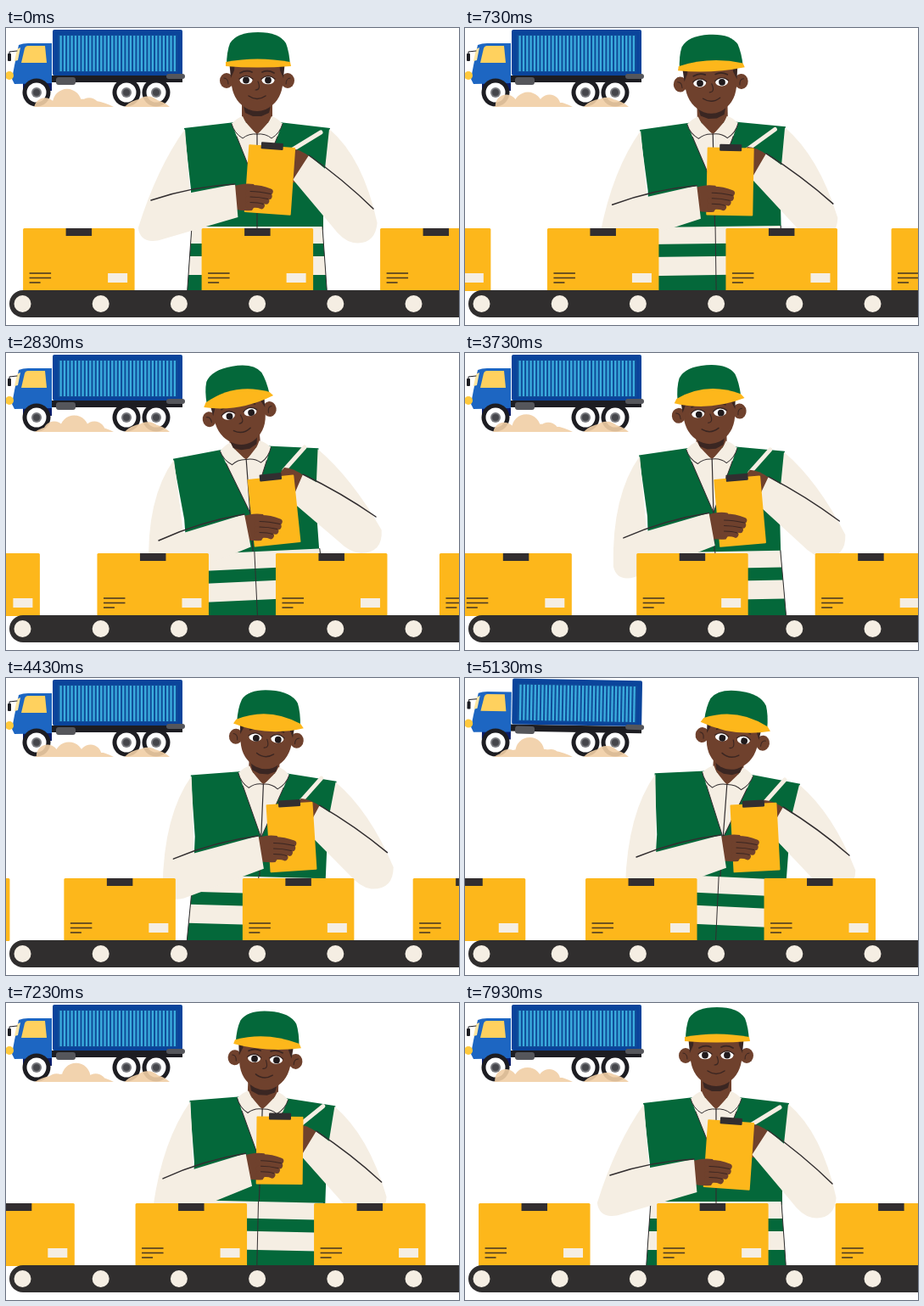
Animation of 534x350 px, one loop 8010 ms. Source, as an HTML page with a canvas:

```html
<!DOCTYPE html>
<html lang="en">
<head>
<meta charset="utf-8">
<title>Warehouse check</title>
<style>
html, body { margin: 0; width: 100%; height: 100%; overflow: hidden; background: #fff; }
canvas { display: block; width: 534px; height: 350px; }
</style>
</head>
<body>
<canvas id="stage"></canvas>
<script>
const W = 534, H = 350, LOOP = 8010, LAST = 7930;
const GREEN = '#04683a', YELLOW = '#fdb71b', CREAM = '#f5eee3', DARK = '#322e30', SKIN = '#6f412d', SHADE = '#3a2622';
const INK = '#1d1d22', STEEL = '#55565b', NAVY = '#0a449b';
const canvas = document.getElementById('stage');
const c = canvas.getContext('2d');
const dpr = window.devicePixelRatio || 1;
canvas.width = W * dpr;
canvas.height = H * dpr;

const mix = (a, b, k) => a + (b - a) * k;
const ease = (a, b, t) => (1 - Math.cos(Math.PI * Math.min(1, Math.max(0, (t - a) / (b - a))))) / 2;

// Path from segments: 2 numbers = line, 4 = quadratic
function trace(segs) {
  c.beginPath();
  segs.forEach((s, i) => {
    if (i === 0) c.moveTo(...s);
    else if (s.length === 2) c.lineTo(...s);
    else c.quadraticCurveTo(...s);
  });
}
function fill(color, ...segs) { trace(segs); c.closePath(); c.fillStyle = color; c.fill(); }
function stroke(color, width, ...segs) {
  trace(segs);
  c.strokeStyle = color; c.lineWidth = width; c.lineCap = 'round'; c.lineJoin = 'round';
  c.stroke();
}
// Closed shape from its right half, mirrored about x = 0
function mirrored(color, ...half) {
  fill(color, ...half, ...half.map(([x, y]) => [-x, y]).reverse());
}
function oval(color, x, y, rx, ry = rx) {
  c.beginPath(); c.ellipse(x, y, rx, ry, 0, 0, 7); c.fillStyle = color; c.fill();
}
function rect(color, x, y, w, h, r = 0) {
  c.beginPath(); c.roundRect(x, y, w, h, r); c.fillStyle = color; c.fill();
}
function turned(x, y, deg, draw) {
  c.save(); c.translate(x, y); c.rotate(deg * Math.PI / 180); draw(); c.restore();
}

// Truck
const TRUCK_LOOP = 3680;

function truckBody() {
  rect(INK, 50, 56, 158, 8);
  rect(NAVY, 55, 2, 153, 54, 2);
  rect('#104c99', 61, 8, 141, 44);
  for (let i = 0; i < 32; i++) rect('#3badde', 63.5 + i * 4.33, 9, 2.3, 42);
  rect(STEEL, 189, 54, 22, 6, 3);
  rect(STEEL, 59, 58, 23, 9, 3);
  fill('#0a1d6b', [20, 60], [54, 60], [54, 74], [20, 74]);
  fill('#1d66c2', [15, 20], [20, 18, 26, 18], [54, 18], [54, 65], [10, 66], [7, 60], [10, 44]);
  fill('#ffd15e', [22, 24], [23, 21, 26, 21], [46, 21], [48, 41], [18, 41]);
  fill('#ffe6a3', [13, 25], [17, 23], [14, 38], [10, 39]);
  stroke(INK, 1, [13, 27], [4, 28], [4, 31]);
  rect(INK, 2, 30, 4, 9, 1);
  oval('#ffc93c', 4, 56, 5);
}

function wheel(x) {
  oval(INK, x, 76, 16.5);
  oval('#fff', x, 76, 11.5);
  oval('#77787d', x, 76, 6);
  oval('#45464b', x, 76, 4);
}

function dust(s) {
  const wave = 3 * Math.sin(4 * Math.PI * s - 0.4);
  c.save();
  c.beginPath(); c.rect(0, 60, 230, 33); c.clip();
  c.globalAlpha = 0.9;
  c.beginPath();
  for (const [x, w] of [[34, 93], [140, 53]]) {
    c.moveTo(x, 93);
    c.bezierCurveTo(x + w * 0.2, 80, x + w * 0.75, 80, x + w, 93);
  }
  const puff = (x, top, r) => { c.moveTo(x + r, top + r); c.arc(x, top + r, r, 0, 7); };
  for (let i = 0; i < 3; i++) {
    const mid = i === 1;
    puff(46 + 26 * i + (14 - 3 * i) * s, mid ? 73 + wave : 81 - wave, mid ? 17 : 13);
  }
  puff(167, 81 + wave / 3, 17);
  c.fillStyle = '#f1cfa6';
  c.fill();
  c.restore();
}

function truck(t) {
  const s = t % TRUCK_LOOP / TRUCK_LOOP;
  const bump = ease(0.27, 0.38, s) - ease(0.45, 0.55, s);
  turned(142, 64, bump, () => { c.translate(-142, -64); truckBody(); });
  [36, 142, 177].forEach(wheel);
  dust(s);
}

// Man: he bows to the board, sways left, then right, lifts the board and returns
const PIVOT = [296, 300];

function poseAt(t) {
  const left = ease(0, 2000, t), right = ease(2900, 5100, t), stay = 1 - ease(6500, LAST, t);
  const bow = left * stay, sway = (2 * right - left) * stay, lift = ease(5150, 6500, t) * stay;
  // Rest value plus its share of bow, sway and lift
  const go = (rest, b, s, l = 0) => rest + b * bow + s * sway + l * lift;
  return {
    bow,
    body: 4.2 * sway,
    head: go(0, -1, 4.5),
    tilt: go(4, -8.5, 1.5),
    board: [go(311, 18, 13, -7), go(179, 8, 1, -20)],
    rCuff: [go(357, 5.5, 12.5), go(150, -2.5, 4.5)],
    rElbow: [go(433, 11.5, 8.5), go(213, -12, 8)],
    lElbow: [go(171, 20, 11, -2), go(203, 13, -5)],
    lCuff: [go(270, 21.5, 10.5, -6), go(184, 3.5, -2.5, -15)],
    pen: [go(36, -12, 0), go(-22, -5, 0)]
  };
}

function vest() {
  mirrored(GREEN, [26, 111], [86, 118], [78, 190], [78, 238]);
  mirrored(CREAM, [30, 112], [24, 128], [0, 188]);
  stroke(DARK, 1, [-24, 128], [0, 188], [24, 128]);
  stroke(DARK, 1.2, [0, 125], [0, 238]);
}

function hips() {
  const half = y => 77 + (y - 234) * 0.07;
  const band = (color, top, end) => mirrored(color, [half(top), top], [half(end), end]);
  band(GREEN, 234, 322);
  band(CREAM, 234, 254);
  band(CREAM, 269, 291);
  for (const x of [-1, 0, 1]) stroke(DARK, 1, [x * half(234), 234], [x * half(322), 322]);
}

function collar() {
  mirrored(SKIN, [18, 78], [18, 106], [0, 126]);
  for (const side of [-1, 1]) {
    const x = d => side * d;
    const edge = [[x(30), 113], [x(27), 124, x(17), 130], [x(10), 124, x(0), 125]];
    fill(CREAM, ...edge, [x(12), 117, x(17), 104], [x(24), 106, x(30), 113]);
    stroke(DARK, 1, ...edge);
  }
}

// Origin lies midway between the ears
function head(bow, shut) {
  mirrored(SHADE, [17, 26], [14, 38], [5, 42]);
  fill(SKIN, [-31, -26], [31, -26], [30, 6], [27, 26, 10, 34], [0, 38, -10, 34], [-27, 26, -30, 6]);
  for (const side of [-1, 1]) {
    const x = d => side * d;
    oval(SKIN, x(36), 0, 8, 9);
    stroke(SHADE, 1, [x(39), -3], [x(34), -3, x(34), 4]);
    fill(SHADE, [x(33), -24], [x(26), -24], [x(27), -12], [x(31), -3]);
    stroke(SHADE, 1.8, [x(20), -9], [x(13), -13, x(6), -10]);
    if (shut) {
      stroke(SHADE, 1.2, [x(20), 0], [x(13), 4, x(6), 0]);
    } else {
      oval('#fff', x(13), -0.5, 7.5, 4.8);
      oval('#201a1c', x(13) + bow, bow - 0.5, 3.9);
      stroke(SHADE, 1.3, [x(21), -2], [x(13), -9, x(5), -2]);
    }
  }
  stroke(SHADE, 1.1, [1, 1], [5, 11, -2, 11]);
  stroke(SHADE, 1.4, [-10, 18], [0, 25, 10, 18]);
  const top = mix(-22, -20, bow), low = mix(-17, -15, bow);
  fill(GREEN, [-36, -17], [-36, -34, -32, -44], [-24, -57, 1, -57], [26, -57, 34, -44], [38, -34, 39, -17]);
  fill(YELLOW, [-37, top], [0, mix(-29, -38, bow), 39, top], [mix(40, 43, bow), low], [0, mix(-14, -2, bow), mix(-37, -40, bow), low]);
}

// Local axes along a sleeve: u runs a to b, n points below it
function axes([ax, ay], [bx, by]) {
  const len = Math.hypot(bx - ax, by - ay), ux = (bx - ax) / len, uy = (by - ay) / len;
  const at = (u, n = 0) => [ax + u * ux - n * uy, ay + u * uy + n * ux];
  return { at, len, cross: x => at((x - ax) / ux) };
}

function penArm(p, [sx, sy], [hole]) {
  const [x, y] = p.rCuff, { at, len, cross } = axes(p.rCuff, p.rElbow);
  stroke(CREAM, 5, [x - 22, y - 5], [x - 22 + p.pen[0], y - 5 + p.pen[1]]);
  fill(SKIN, [x + 2, y + 2], [x - 12, y - 8, x - 22, y - 8], [x - 30, y, x - 27, y + 10], [x - 20, y + 32], [x - 12, y + 32]);
  fill(CREAM, [sx, sy], [sx + 40, sy + 34, ...at(113, 10)], [...at(128, 32), ...at(106, 46)],
    [...at(95, 52), ...at(75, 47)], at(4, 34), at(0), cross(hole));
  stroke(DARK, 1.5, at(0), [...at(len / 2, -4), ...at(len)]);
}

function board(p) {
  turned(...p.board, p.tilt, () => {
    rect(YELLOW, -27.5, -40, 55, 80, 1);
    rect(DARK, -13, -44, 26, 8, 1);
  });
}

function hand(x, y) {
  fill(SKIN, [x - 4, y], [x + 10, y - 5, x + 22, y - 3], [x + 30, y + 12], [x + 20, y + 28], [x + 8, y + 29, x - 2, y + 26]);
  for (let i = 0; i < 4; i++) {
    const tip = 41 - 1.1 * i * i, fy = y + 2 + 6.5 * i;
    stroke(SKIN, 7.5, [x + 16, fy], [x + 28, fy - 1, x + tip, fy + 4 - i]);
    if (i) stroke(SHADE, 1.1, [x + 18, fy - 3], [x + 28, fy - 3, x + tip + 2, fy + 0.5 - i / 2]);
  }
}

function holdArm(p, [sx, sy], [hole]) {
  const { at, len, cross } = axes(p.lElbow, p.lCuff);
  hand(p.lCuff[0], p.lCuff[1] + 3);
  fill(CREAM, [sx, sy], [sx - 33, sy + 46, ...at(-21, 29)], [...at(-22, 48), ...at(0, 48)], at(len - 4, 39), at(len), cross(hole));
  stroke(DARK, 1.5, at(0), [...at(len / 2, -7), ...at(len)]);
}

function man(t) {
  const p = poseAt(t), [px, py] = PIVOT;
  const a = p.body * Math.PI / 180, cos = Math.cos(a), sin = Math.sin(a);
  const placed = (x, y) => [px + x * cos - (y - py) * sin, py + x * sin + (y - py) * cos];
  const leaning = (deg, draw) => turned(px, py, deg, () => { c.translate(0, -py); draw(); });
  leaning(p.body, vest);
  leaning(p.body * 0.65, hips);
  leaning(p.body, () => {
    collar();
    turned(0, 104 + 9 * p.bow, p.head, () => { c.translate(0, -42); head(p.bow, t > 1420 && t < 1580); });
  });
  penArm(p, placed(85, 119), placed(80, 165));
  board(p);
  holdArm(p, placed(-85, 119), placed(-79, 190));
}

// Conveyor
const GAP = 210.5;

function box(x) {
  rect(YELLOW, x, 236, 131.5, 74, 1.5);
  rect(DARK, x + 50.5, 236, 30.5, 9);
  for (let i = 0; i < 3; i++) rect('#4d3b22', x + 7.5, 288.2 + 5.5 * i, i < 2 ? 25.5 : 13, 1.6);
  rect(CREAM, x + 100, 289, 23, 11);
}

function boxes(t) {
  const run = (t * 0.10525 + 3 * ease(4000, 4400, t)) % GAP;
  for (let k = -2; k <= 2; k++) {
    const u = 20 + run + k * GAP;
    // Parcels run slower near both ends
    box(u + Math.max(0, 20 - u) * 0.093 - Math.max(0, u - 441) * 0.2);
  }
}

function belt() {
  rect('#302e2e', 4, 309, 560, 32, 16);
  for (let i = 0; i < 6; i++) oval(CREAM, 19.5 + i * 92.2, 325, 10);
}

function frame(now) {
  const t = Math.min(now % LOOP, LAST);
  c.setTransform(dpr, 0, 0, dpr, 0, 0);
  c.fillStyle = '#fff';
  c.fillRect(0, 0, W, H);
  truck(t);
  man(t);
  boxes(t);
  belt();
}

const start = performance.now();
function tick() {
  frame(performance.now() - start);
  requestAnimationFrame(tick);
}
tick();
</script>
</body>
</html>
```
